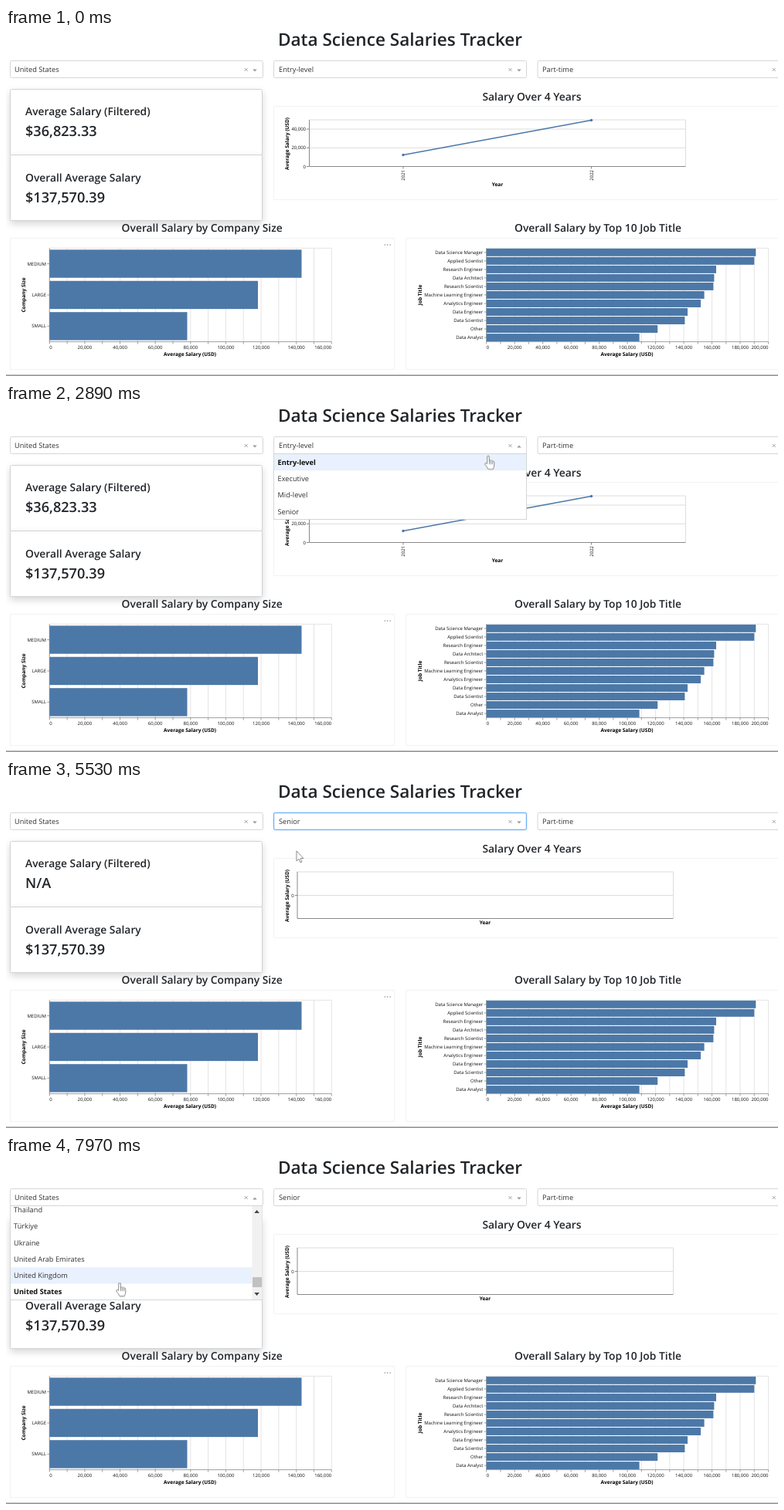
Recreate the animation shown at these times as an HTML page. Size 999 by 451 pixels, loop 8 s.

```html
<!DOCTYPE html>
<html lang="en">
<head>
<meta charset="utf-8">
<title>Data Science Salaries Tracker</title>
<style>
html, body { margin: 0; width: 100%; height: 100%; overflow: hidden; background: #fff; }
svg { display: block; width: 999px; height: 451px; }
text { font-family: "Open Sans", "Noto Sans", sans-serif; fill: #212529; text-rendering: geometricPrecision; }
.h1 { font-size: 22.6px; font-weight: 600; }
.h2 { font-size: 13.85px; font-weight: 600; }
.num { font-size: 18.15px; font-weight: 600; }
.ui { font-size: 9.25px; fill: #333; }
.sel { font-weight: 700; fill: #111; }
.lab { font-size: 6px; fill: #111; }
.axis { font-size: 6.55px; font-weight: 700; fill: #000; }
.mid { text-anchor: middle; }
.end { text-anchor: end; }
.box { fill: #fff; stroke: #d6d6d6; }
.card { fill: #fff; stroke: #d2d2d2; filter: drop-shadow(0 4px 5px #00000028); }
.panel { fill: none; stroke: #f2f2f2; }
.grid { fill: none; stroke: #ddd; }
.rule { fill: none; stroke: #888; }
.bar, .dot { fill: #4c78a8; }
.line { fill: none; stroke: #4c78a8; stroke-width: 1.3; }
.x { fill: none; stroke: #999; stroke-width: .9; }
.tri { fill: #999; }
.hot { fill: #e8f1fd; }
.focus { fill: none; stroke: #6eaff3; filter: drop-shadow(0 0 1.2px #007eff60); }
.hand, .arrow { fill: #fff; stroke: #666; stroke-width: .75; stroke-linejoin: round; }

.before, .after, .entry, .senior, .focus, .menu1, .menu2, .hand, .arrow, .hot1, .hot2, .list2, .tri1, .tri2, .more {
  animation: 8s step-end infinite;
}
.before { animation-name: before; }
.after { animation-name: after; }
.entry { animation-name: entry; }
.senior { animation-name: senior; }
.focus { animation-name: focus; }
.menu1 { animation-name: menu1; }
.menu2 { animation-name: menu2; }
.hand { animation-name: hand; }
.arrow { animation-name: arrow; }
.hot1 { animation-name: hot1; }
.hot2 { animation-name: hot2; }
.list2 { animation-name: list2; }
.tri1 { animation-name: tri1; }
.tri2 { animation-name: tri2; }
.more { animation-name: more; }
.cursor { animation: move 8s ease-in-out infinite; }

@keyframes before { 0% { visibility: visible } 53.75%, 100% { visibility: hidden } }
@keyframes after { 0% { visibility: hidden } 53.75%, 100% { visibility: visible } }
@keyframes entry { 0% { visibility: visible } 51.375%, 100% { visibility: hidden } }
@keyframes senior { 0% { visibility: hidden } 51.375%, 100% { visibility: visible } }
@keyframes focus { 0% { visibility: hidden } 51.375% { visibility: visible } 82%, 100% { visibility: hidden } }
@keyframes menu1 { 0% { visibility: hidden } 30.5% { visibility: visible } 51.375%, 100% { visibility: hidden } }
@keyframes menu2 { 0% { visibility: hidden } 82%, 100% { visibility: visible } }
@keyframes more { 0% { visibility: hidden } 53.75% { visibility: visible } 64%, 100% { visibility: hidden } }
@keyframes hand { 0% { visibility: visible } 59% { visibility: hidden } 77.5%, 100% { visibility: visible } }
@keyframes arrow { 0% { visibility: hidden } 59% { visibility: visible } 77.5%, 100% { visibility: hidden } }
@keyframes tri1 { 0% { fill: #999 } 24.5% { fill: #555 } 34.375%, 100% { fill: #999 } }
@keyframes tri2 { 0% { fill: #999 } 78% { fill: #555 } 84.5%, 100% { fill: #999 } }
@keyframes hot1 {
  0% { transform: none } 37.5% { transform: translateY(21.3px) }
  41% { transform: translateY(42.6px) } 46.8%, 100% { transform: translateY(63.9px) }
}
@keyframes hot2 {
  0% { transform: none } 91% { transform: translateY(21.25px) } 95%, 100% { transform: none }
}
@keyframes list2 { 0% { transform: none } 92%, 100% { transform: translateY(-6.2px) } }
@keyframes move {
  0%, 16% { transform: translate(1012px, 70px) }
  25.5%, 33% { transform: translate(662px, 54.5px) }
  43.5%, 45.5% { transform: translate(457.5px, 124.5px) }
  48%, 58.5% { transform: translate(445px, 138px) }
  78.5%, 82% { transform: translate(320.5px, 55px) }
  86.5%, 88% { transform: translate(162.5px, 158.5px) }
  91.5%, 93% { transform: translate(157px, 176px) }
  97%, 100% { transform: translate(147px, 164.5px) }
}
</style>
</head>
<body>
<svg viewBox="0 0 999 451">
  <text class="h1 mid" x="510" y="23">Data Science Salaries Tracker</text>

  <g id="controls"></g>
  <text class="ui" x="11" y="57.3">United States</text>
  <text class="ui entry" x="353" y="57.3">Entry-level</text>
  <text class="ui senior" x="353" y="57.3">Senior</text>
  <text class="ui" x="694" y="57.3">Part-time</text>
  <rect class="focus" x="346.5" y="42.5" width="327" height="22" rx="2"/>

  <rect class="card" x="5.5" y="79.5" width="326" height="85" rx="2"/>
  <rect class="card" x="5.5" y="164.5" width="326" height="85" rx="2"/>
  <text class="h2" x="25" y="113">Average Salary (Filtered)</text>
  <text class="num before" x="25" y="140">$36,823.33</text>
  <text class="num after" x="25" y="140">N/A</text>
  <text class="h2" x="25" y="199">Overall Average Salary</text>
  <text class="num" x="25" y="225.5">$137,570.39</text>

  <text class="h2 mid" x="680.5" y="93.5">Salary Over 4 Years</text>
  <text class="axis mid" transform="translate(365.8 150) rotate(-90)">Average Salary (USD)</text>
  <g class="before">
    <path class="panel" d="M1000 101.5H346.5V222.5H1000"/>
    <path class="grid" d="M392.5 119H879.5V179M392.5 131H879M392.5 155.3H879"/>
    <path class="rule" d="M392.5 119V179.5H879.5M389 131h3M389 155.3h3M389 179.5h3M514 179.5v3M757.5 179.5v3"/>
    <path class="line" d="M514 164.5L757.5 119.5"/>
    <circle class="dot" cx="514" cy="164.5" r="1.7"/><circle class="dot" cx="757.5" cy="119.5" r="1.7"/>
    <text class="lab end" x="388" y="133.1">40,000</text>
    <text class="lab end" x="388" y="157.4">20,000</text>
    <text class="lab end" x="388" y="181.6">0</text>
    <text class="lab end" transform="translate(516.2 184) rotate(-90)">2021</text>
    <text class="lab end" transform="translate(759.7 184) rotate(-90)">2022</text>
    <text class="axis mid" x="636" y="205">Year</text>
  </g>
  <g class="after">
    <path class="panel" d="M1000 101.5H346.5V204.5H1000"/>
    <path class="grid" d="M377 119H863.5V179M377 149.5H863"/>
    <path class="rule" d="M377 119V179.5H863.5M374 149.5h3"/>
    <text class="lab end" x="372.6" y="151.5">0</text>
    <text class="axis mid" x="620" y="187.3">Year</text>
  </g>
  <path class="rule more" d="M998.5 106v8"/>

  <text class="h2 mid" x="253.7" y="264.3">Overall Salary by Company Size</text>
  <rect class="panel" x="5.5" y="272.5" width="497" height="170"/>
  <g id="sizes"></g>
  <text class="axis mid" transform="translate(24.5 346) rotate(-90)">Company Size</text>
  <text class="axis mid" x="238" y="425">Average Salary (USD)</text>
  <g fill="#bbb"><circle cx="490.4" cy="281" r="1"/><circle cx="493.7" cy="281" r="1"/><circle cx="497" cy="281" r="1"/></g>

  <text class="h2 mid" x="766" y="264.3">Overall Salary by Top 10 Job Title</text>
  <path class="panel" d="M1000 272.5H517.5V442.5H1000"/>
  <g id="titles"></g>
  <text class="axis mid" transform="translate(537.5 346) rotate(-90)">Job Title</text>
  <text class="axis mid" x="803.5" y="425">Average Salary (USD)</text>
  <path d="M0 450.2H999" stroke="#77747a" stroke-width="1.2"/>

  <g class="menu1">
    <path d="M659 50h10v9h-10z" fill="#fff"/>
    <path class="tri" d="M661.3 56.4h5.4l-2.7-2.9z"/>
    <rect class="box" x="346.5" y="64.5" width="327" height="85"/>
    <rect class="hot hot1" x="347" y="65" width="326" height="21.2"/>
    <g id="levels"></g>
  </g>

  <clipPath id="clip"><path d="M6 65h325.5v121h-325.5z"/></clipPath>
  <g class="menu2">
    <path d="M317 50h10v9h-10z" fill="#fff"/>
    <path class="tri" d="M319.3 56.4h5.4l-2.7-2.9z"/>
    <rect class="box" x="5.5" y="64.5" width="326" height="122"/>
    <g clip-path="url(#clip)">
      <g class="list2">
        <rect class="hot hot2" x="6" y="150.4" width="313" height="21.2"/>
        <g id="countries"></g>
      </g>
      <path d="M318.5 65h13v121h-13z" fill="#f1f1f1"/>
      <path d="M319 157h12v13h-12z" fill="#c1c1c1"/>
      <path d="M321.3 74h6.6l-3.3-4zM321.3 177h6.6l-3.3 4z" fill="#444"/>
    </g>
  </g>

  <g class="cursor">
    <path class="hand" d="M-1.3 10V1Q-1.3-.3 0-.3T1.3 1V6Q2 5.2 3.3 5.8Q4.5 5.3 5.5 6.3Q7.6 6.2 7.8 8V12Q7.4 14.5 6.3 17H0Q-1.5 13.5-4.3 10.7Q-4.6 8.5-2.5 9ZM1.5 6v4.5M3.5 6.5v4M5.6 7v3.5"/>
    <path class="arrow" d="M0 0V13L3 10.3L5 15L7 14.1L5 9.6H9Z"/>
  </g>
</svg>
<script>
const fill = (id, html) => { document.getElementById(id).innerHTML = html; };
const text = (cls, x, y, s) => `<text class="${cls}" x="${x}" y="${y}">${s}</text>`;

const control = (x, cross, tri, cls) =>
  `<rect class="box" x="${x}" y="42.5" width="327" height="22" rx="2"/>
   <path class="x" d="M${cross - 2} 52l4 4m0-4l-4 4"/>
   <path class="tri ${cls}" d="M${tri - 2.7} 53.5h5.4l-2.7 2.9z"/>`;
fill('controls', control(5.5, 310.7, 322, 'tri2') + control(346.5, 652.5, 664, 'tri1') + control(688, 993.7, 1005, ''));

const options = (names, x, y, step, selected) => names
  .map((s, i) => text(i === selected ? 'ui sel' : 'ui', x, y + i * step, s)).join('');
fill('levels', options(['Entry-level', 'Executive', 'Mid-level', 'Senior'], 351.5, 78.8, 21.3, 0));
fill('countries', options(['Thailand', 'Türkiye', 'Ukraine', 'United Arab Emirates', 'United Kingdom', 'United States'],
  10, 79.3, 21.22, 5));

// Horizontal bar chart; max is in thousands, rows are [label, bar end].
function bars(id, x, width, max, labelX, rows) {
  const top = 285.3, bottom = 406.6, step = (bottom - top) / rows.length;
  let grid = `M${x} ${top}H${x + width}`, ticks = `M${x} ${top}V${bottom}H${x + width}`, out = '';
  for (let k = 0; k <= max; k += 10) {
    const tx = x + width * k / max;
    grid += `M${tx} ${top}V${bottom}`;
    ticks += `M${tx} ${bottom}v3`;
    if (k % 20 === 0) {
      const last = k === max;
      out += text('lab ' + (last ? 'end' : k ? 'mid' : ''), last ? x + width : tx, 415.7, k ? k + ',000' : '0');
    }
  }
  rows.forEach(([name, end], i) => {
    const y = top + i * step, mid = y + step / 2;
    ticks += `M${x} ${mid}h-3`;
    out += `<rect class="bar" x="${x}" y="${y + step * .05}" width="${end - x}" height="${step * .9}"/>`
      + text('lab end', labelX, mid + 2.1, name);
  });
  fill(id, `<path class="grid" stroke-width=".8" d="${grid}"/><path class="rule" stroke-width=".8" d="${ticks}"/>` + out);
}
bars('sizes', 56.3, 365, 160, 52, [['MEDIUM', 382.5], ['LARGE', 326], ['SMALL', 234.5]]);
bars('titles', 621.7, 364.8, 200, 617.3, [
  ['Data Science Manager', 970.3], ['Applied Scientist', 968.3], ['Research Engineer', 919],
  ['Data Architect', 916.4], ['Research Scientist', 915.4], ['Machine Learning Engineer', 903.6],
  ['Analytics Engineer', 899], ['Data Engineer', 882], ['Data Scientist', 878.4],
  ['Other', 843.2], ['Data Analyst', 819.6]
]);
</script>
</body>
</html>
```
